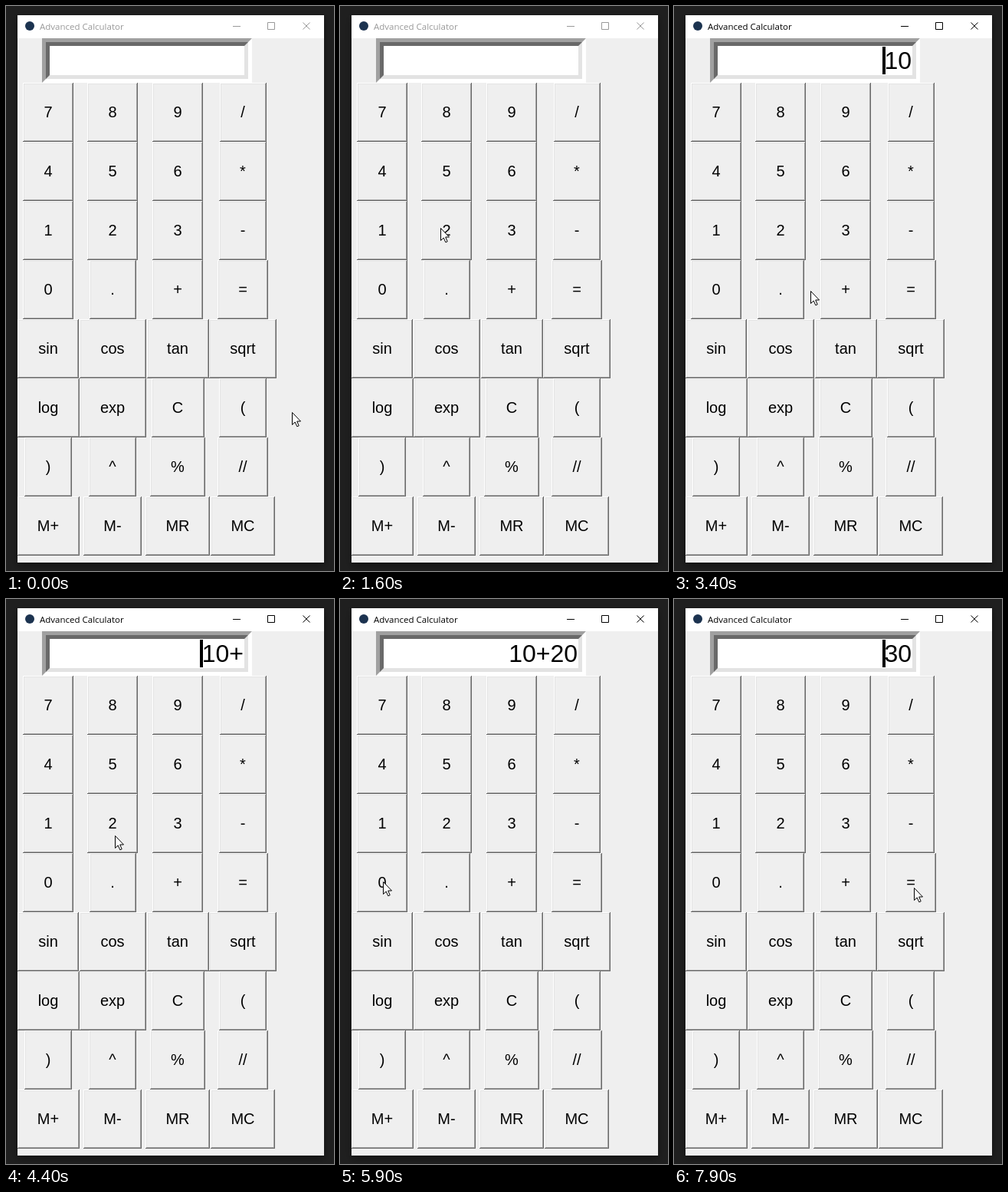
Recreate the animation shown at these times as an HTML page. Size 428 by 736 pixels, loop 8000 ms.

```html
<!DOCTYPE html>
<html lang="en">
<head>
<meta charset="utf-8">
<title>Advanced Calculator</title>
<style>
  html, body { margin: 0; width: 100%; height: 100%; overflow: hidden; background: #1f1f1f; }
  svg { display: block; width: 428px; height: 736px; }
  text { font-family: "Liberation Sans", Arial, sans-serif; }
  .key { font-size: 20px; text-anchor: middle; }
  .value { font-size: 32px; text-anchor: end; }
  .title { font: 11.5px "Open Sans", sans-serif; }
</style>
</head>
<body>
<svg id="stage" viewBox="0 0 428 736"></svg>
<script>
const LOOP = 8000, STEP = 100;
const FACE = '#efefef', DARK = '#696969', SHADE = '#a0a0a0', LIGHT = '#e3e3e3', WHITE = '#fff';
const COLUMNS = [55, 139, 224, 309];
const ROWS = [
  '7:66 8:66 9:66 /:61', '4:66 5:66 6:66 *:62', '1:66 2:66 3:66 -:62', '0:66 .:61 +:66 =:66',
  'sin:80 cos:87 tan:81 sqrt:88', 'log:81 exp:87 C:69 (:62', '):62 ^:62 %:72 //:66',
  'M+:81 M-:76 MR:84 MC:84'
];

// Pointer waypoints: time, x, y
const PATH = [
  [0, 373, 529], [300, 350, 495], [900, 232, 375], [1300, 155, 303], [1600, 131, 289],
  [1700, 131, 289], [2100, 75, 291], [2300, 58, 296], [2500, 58, 297], [2600, 58, 336],
  [2700, 59, 371], [2900, 58, 378], [3200, 58, 378], [3400, 178, 371], [3600, 217, 372],
  [3700, 222, 374], [4000, 222, 374], [4200, 178, 330], [4400, 142, 308], [4600, 139, 301],
  [5300, 139, 301], [5600, 58, 355], [5700, 48, 362], [5900, 56, 368], [6000, 56, 368],
  [6400, 215, 381], [6600, 302, 378], [6700, 313, 376], [LOOP, 313, 376]
];
const PRESSES = { 1: 2400, 0: 3100, '+': 3900, 2: 5200, '=': 7100 };
const VALUES = [
  [0, ''], [2500, '1'], [3200, '10'], [4000, '10+'], [5300, '10+2'], [5900, '10+20'], [7200, '30']
];
const FOCUS = 2400, BLINK_START = 2500, BLINK_ON = 600, BLINK = 900;

const stage = document.getElementById('stage');

function set(node, attrs) {
  for (const name in attrs) node.setAttribute(name, attrs[name]);
  return node;
}

function add(parent, tag, attrs, text) {
  const node = set(document.createElementNS('http://www.w3.org/2000/svg', tag), attrs);
  if (text !== undefined) node.textContent = text;
  return parent.appendChild(node);
}

const rect = (parent, x, y, width, height, fill) =>
  add(parent, 'rect', { x, y, width, height, fill });

function addWindow() {
  const filter = add(stage, 'filter', { id: 'shadow', x: '-10%', y: '-10%', width: '120%', height: '120%' });
  add(filter, 'feDropShadow', { dx: 0, dy: 3, stdDeviation: 5, 'flood-opacity': 0.4 });
  rect(stage, 0, 0, 428, 736, '#1f1f1f');
  set(rect(stage, 15, 12, 400, 713, FACE), { filter: 'url(#shadow)' });
  rect(stage, 15, 12, 400, 30, WHITE);
  add(stage, 'circle', { cx: 31, cy: 26, r: 6, fill: '#1c3350' });
  const title = add(stage, 'text', { class: 'title', x: 44, y: 31 }, 'Advanced Calculator');
  const controls = add(stage, 'path', {
    d: 'M296 26.5h10M341.5 21.5h9v9h-9zM387.5 21.5l9 9m0-9l-9 9', fill: 'none'
  });
  return { title, controls };
}

// One mitred ring of a sunken border
function addRing(x, y, w, h, size, topLeft, bottomRight) {
  rect(stage, x, y, w, h, bottomRight);
  add(stage, 'path', {
    d: `M${x} ${y + h}V${y}H${x + w}l${-size} ${size}H${x + size}V${y + h - size}z`, fill: topLeft
  });
}

function addEntry() {
  addRing(47, 42, 274, 58, 5, SHADE, WHITE);
  addRing(52, 47, 264, 48, 5, DARK, LIGHT);
  rect(stage, 57, 52, 254, 38, WHITE);
  return {
    caret: rect(stage, 290, 53, 4, 36, '#000'),
    value: add(stage, 'text', { class: 'value', x: 310, y: 82 })
  };
}

function addKey(label, w, cx, y) {
  const x = Math.round(cx - w / 2), h = 77;
  const edges = [
    rect(stage, x, y, w, h),
    rect(stage, x, y, w - 1, h - 1),
    rect(stage, x + 1, y + 1, w - 2, h - 2),
    rect(stage, x + 1, y + 1, w - 3, h - 3)
  ];
  rect(stage, x + 2, y + 2, w - 4, h - 4, FACE);
  const text = add(stage, 'text', { class: 'key', x: cx, y: y + 45 }, label);
  return { label, edges, text };
}

function drawKey({ label, edges, text }, t) {
  const start = PRESSES[label];
  const down = t >= start && t < start + STEP;
  const colors = down ? [WHITE, SHADE, LIGHT, DARK] : [DARK, WHITE, SHADE, LIGHT];
  edges.forEach((edge, i) => set(edge, { fill: colors[i] }));
  set(text, { transform: down ? 'translate(1 1)' : 'translate(0 0)' });
}

function pointerAt(t) {
  const i = PATH.findIndex(p => p[0] > t);
  const [t0, x0, y0] = PATH[i - 1], [t1, x1, y1] = PATH[i];
  const k = (t - t0) / (t1 - t0);
  return [Math.round(x0 + (x1 - x0) * k), Math.round(y0 + (y1 - y0) * k)];
}

const { title, controls } = addWindow();
const { caret, value } = addEntry();
const keys = ROWS.flatMap((row, r) => row.split(' ').map((item, c) => {
  const [label, width] = item.split(':');
  return addKey(label, +width, COLUMNS[c], 100 + r * 77);
}));
const pointer = add(stage, 'path', {
  d: 'M.5 .5V16.5L4.2 13L6.8 18.8L9.2 17.8L6.7 12H11.5Z', fill: WHITE, stroke: '#000'
});

function draw(t) {
  const ink = t < FOCUS ? '#999' : '#000';
  set(title, { fill: ink });
  set(controls, { stroke: ink });

  value.textContent = VALUES.filter(v => v[0] <= t).pop()[1];
  const lit = t >= BLINK_START && (t - BLINK_START) % BLINK < BLINK_ON;
  set(caret, {
    x: Math.floor(308 - value.getComputedTextLength()),
    visibility: lit ? 'visible' : 'hidden'
  });

  keys.forEach(key => drawKey(key, t));
  set(pointer, { transform: `translate(${pointerAt(t)})` });
}

const begin = performance.now();
function tick() {
  const t = (performance.now() - begin) % LOOP;
  draw(Math.floor(t / STEP) * STEP);
  requestAnimationFrame(tick);
}
tick();
</script>
</body>
</html>
```
